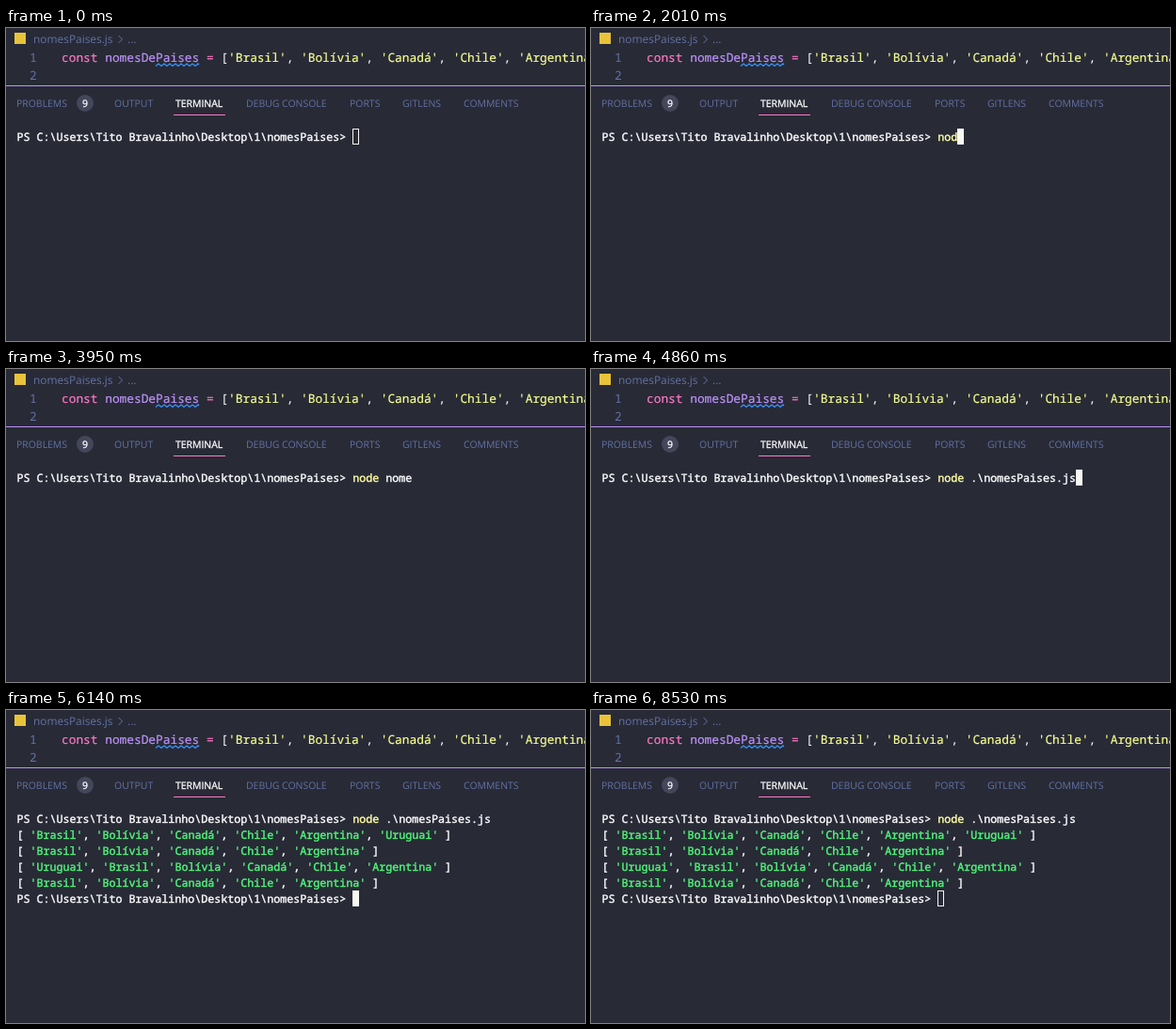
These frames come from a looping animation (615 by 333 pixels, 8590 ms). An HTML page:

```html
<!DOCTYPE html>
<html lang="pt">
<head>
<meta charset="utf-8">
<title>Terminal</title>
<style>
  html, body { margin: 0; width: 100%; height: 100%; overflow: hidden; background: #282a36; }
  svg { display: block; }
  text { white-space: pre; text-rendering: geometricPrecision; color: #fff; }
  text, tspan { fill: currentColor; stroke: currentColor; stroke-width: 0; }
  .ui text { font: 10.45px "Open Sans", "Noto Sans", sans-serif; color: #6272a4; }
  .ui .crumb { font-size: 11.9px; }
  .ui .active { color: #fff; stroke-width: .3px; }
  .code text { font: 12.83px "Noto Sans Mono", "DejaVu Sans Mono", monospace; }
  .code tspan { stroke-width: .2px; }
  .term text, .term tspan { stroke-width: .4px; }
  .term text { font: 500 11.667px "Noto Sans Mono", "DejaVu Sans Mono", monospace; }
  .code .num { color: #6272a4; }
  .pink { color: #ff79c6; }
  .purple { color: #bd93f9; }
  .yellow { color: #f6ff8f; }
  .command { color: #ffffa5; }
  .green { color: #50fa7b; }
</style>
</head>
<body>
<svg width="615" height="333" viewBox="0 0 615 333">
  <g class="ui">
    <rect x="9" y="5" width="12" height="12" fill="#e8c33a"/>
    <text class="crumb" x="29" y="16">nomesPaises.js</text>
    <path d="M119.5 8l4 4-4 4" fill="none" stroke="#6272a4"/>
    <text class="crumb" x="129" y="16">...</text>
    <rect y="61" width="615" height="1" fill="#bd93f9"/>
    <text x="11" y="84">PROBLEMS</text>
    <circle cx="84" cy="80" r="9" fill="#44475a"/>
    <text class="active" x="84" y="84" text-anchor="middle" font-weight="600">9</text>
    <text x="115" y="84">OUTPUT</text>
    <text class="active" x="180" y="84">TERMINAL</text>
    <rect x="178" y="92" width="55" height="1" fill="#ff79c6"/>
    <text x="255" y="84">DEBUG CONSOLE</text>
    <text x="365" y="84">PORTS</text>
    <text x="421" y="84">GITLENS</text>
    <text x="486" y="84">COMMENTS</text>
  </g>
  <g class="code">
    <text class="num" x="25" y="36">1</text>
    <text class="num" x="25" y="55">2</text>
    <text id="source" x="59" y="36"></text>
    <path id="squiggle" fill="none" stroke="#3794ff" stroke-width="1.3"/>
  </g>
  <g class="term" id="term"></g>
  <rect id="cursor" stroke="#f8f8f2" width="6" height="16"/>
  <path id="pointer" d="M0 .5h3m1 0h3M3.5 1v13M0 14.5h3m1 0h3" fill="none" stroke="#f8f8f2"/>
</svg>
<script>
const LOOP = 8590, COL = 7, ROW = 17, LEFT = 11, TOP = 107;
const PROMPT = 'PS C:\\Users\\Tito Bravalinho\\Desktop\\1\\nomesPaises> ';
const $ = id => document.getElementById(id);
const svg = tag => document.createElementNS('http://www.w3.org/2000/svg', tag);
const span = (cls, s) => `<tspan class="${cls}">${s}</tspan>`;
const colourStrings = (s, cls) => s.replace(/'[^']*'?/g, m => span(cls, m));
const list = names => `[ ${names.map(n => `'${n}'`).join(', ')} ]`;

const countries = ['Brasil', 'Bolívia', 'Canadá', 'Chile', 'Argentina'];
const output = [
  [...countries, 'Uruguai'], countries, ['Uruguai', ...countries], countries
].map(list);

// [time, typed text, time the cursor reappears]
const typing = [
  [0, ''], [1620, 'n'], [1740, 'no'], [1940, 'nod', 2010], [2130, 'node', 2200],
  [2260, 'node ', 2330], [3160, 'node n'], [3290, 'node no', 3360],
  [3620, 'node nom', 3680], [3950, 'node nome', 4010], [4860, 'node .\\nomesPaises.js']
];
const ENTER = 5940, FIRST_LINE = 6070, DONE = 6140;

$('source').innerHTML = span('pink', 'const ') + span('purple', 'nomesDePaises') + span('pink', ' = ') +
  colourStrings("['" + countries.join("', '"), 'yellow');
$('squiggle').setAttribute('d', 'M159 40.5' + 'l3 -2.5 3 2.5'.repeat(7) + 'l3 -2.5 1 1');

const rows = [PROMPT, ...output, PROMPT].map((line, i) => {
  const row = svg('text');
  row.setAttribute('x', LEFT + .5);
  row.setAttribute('y', TOP + 13 + i * ROW);
  row.innerHTML = colourStrings(line.replace('>', '&gt;'), 'green');
  $('term').append(row);
  return row;
});
const command = svg('tspan');
rows[0].append(command);

function show(el, visible) {
  el.setAttribute('visibility', visible ? 'visible' : 'hidden');
}

function place(el, x, y) {
  el.setAttribute('transform', `translate(${x} ${y})`);
}

function draw(t) {
  const [, typed, cursorBack = 0] = typing.findLast(([start]) => t >= start);
  command.innerHTML = span('command', typed.slice(0, 4)) + typed.slice(4);

  const shown = t >= DONE ? 6 : t >= FIRST_LINE ? 2 : 1;
  rows.forEach((row, i) => show(row, i < shown));

  let col = PROMPT.length, line = 0;
  if (t >= DONE) line = 5;
  else if (t >= ENTER) [col, line] = [0, shown];
  else col += typed.length;
  place($('cursor'), LEFT + col * COL + .5, TOP + line * ROW + .5);
  $('cursor').setAttribute('fill', t < 610 || t >= 8530 ? 'none' : '#f8f8f2');
  show($('cursor'), t >= cursorBack);

  // The mouse pointer swings in and out at the right edge.
  const step = Math.floor((t - 7400) / 66);
  show($('pointer'), step >= 0 && step < 5);
  place($('pointer'), Math.round(614 - 13 * Math.sin(step * Math.PI / 5)), 294 + 6 * step);
}

function tick() {
  draw(performance.now() % LOOP);
  requestAnimationFrame(tick);
}
tick();
</script>
</body>
</html>
```
